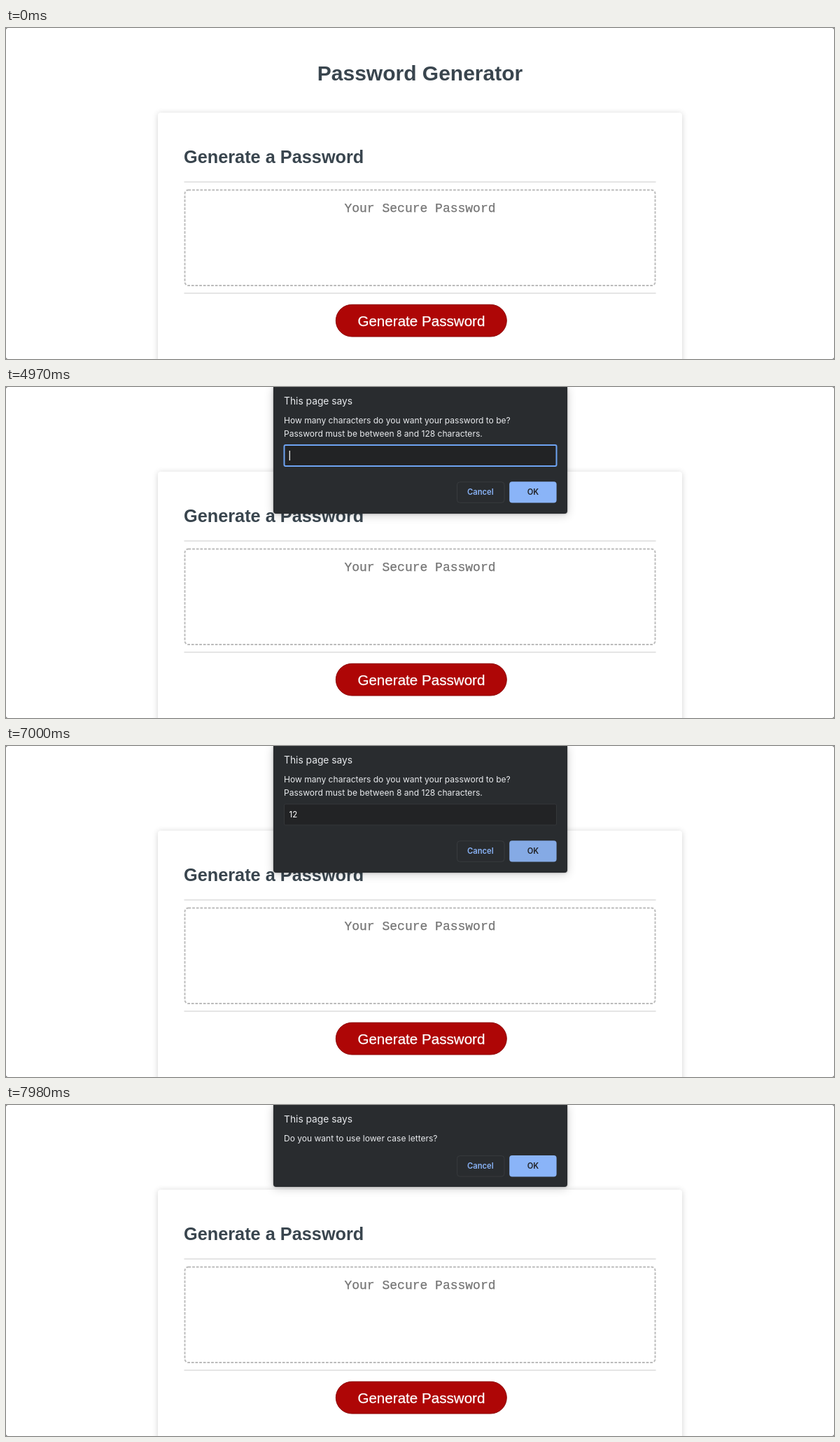
An HTML page for the animation above (8 s loop, 1183 by 473 pixels).

```html
<!DOCTYPE html>
<html lang="en">
<head>
<meta charset="utf-8">
<title>Password Generator</title>
<style>
  html, body { margin: 0; width: 100%; height: 100%; overflow: hidden; background: #666; }
  #stage { position: relative; width: 1183px; height: 473px; overflow: hidden; background: #fff; border-radius: 3px; }
  svg { display: block; }
  .sans { font-family: "Liberation Sans", Arial, sans-serif; }
  .heading { font-weight: 700; fill: #39454e; }
  .card { position: absolute; left: 217px; top: 121px; width: 749px; height: 400px; border-radius: 4px;
          box-shadow: 0 1px 8px rgba(0, 0, 0, .18); }
  #page { position: absolute; left: 0; top: 0; }
  .dialog { position: absolute; left: 381.5px; top: 0; width: 420px; background: #292c2f; border-radius: 0 0 4px 4px;
            transform-origin: 50% 100%; opacity: 0;
            box-shadow: 0 2px 14px rgba(0, 0, 0, .2), 0 0 3px rgba(0, 0, 0, .35); }
  .dialog text { font-family: Inter, sans-serif; font-size: 12.05px; fill: #e8eaed; }
  .dialog .title { font-size: 13.8px; }
  .dialog .label { font-size: 11.2px; font-weight: 600; text-anchor: middle; }
  .dialog .value { font-size: 11.5px; fill: #fff; }
</style>
</head>
<body>
<div id="stage">
  <div class="card"></div>
  <svg id="page" width="1183" height="473">
    <text class="sans heading" x="591.5" y="75" font-size="30" text-anchor="middle">Password Generator</text>
    <text class="sans heading" x="254" y="193" font-size="25.3">Generate a Password</text>
    <path d="M254.5 220H928.5M254.5 379H928.5" stroke="#e5e5e5" stroke-width="2"/>
    <rect x="255.5" y="231.5" width="672" height="136.5" rx="5" fill="none"
          stroke="#bbb" stroke-width="1.9" stroke-dasharray="3.75 1.9"/>
    <text x="591.5" y="263" font-size="18" fill="#757575" stroke="#757575" stroke-width=".25" text-anchor="middle"
          font-family="'Liberation Mono', 'Courier New', monospace">Your Secure Password</text>
    <rect x="471.3" y="395.3" width="244" height="45.7" rx="22.85" fill="#ae0606" stroke="#8c0505"/>
    <text class="sans" x="593.4" y="425.5" font-size="20.6" fill="#fff" stroke="#fff" stroke-width=".25"
          text-anchor="middle">Generate Password</text>
  </svg>
</div>
<script>
const LOOP = 8000, STEP = 70;
const stage = document.getElementById("stage");

// Dialog contents are laid out in stage coordinates through the viewBox.
function makeDialog(height, lines, field = "") {
  const el = document.createElement("div");
  const top = height - 45.2;
  el.className = "dialog";
  el.style.height = height + "px";
  el.innerHTML = `<svg width="420" height="${height}" viewBox="381.5 0 420 ${height}">
    <text class="title" x="396.5" y="25">This page says</text>
    ${lines.map((line, i) => `<text x="396.5" y="${52.3 + i * 18.7}">${line}</text>`).join("")}
    ${field}
    <rect x="644" y="${top + .5}" width="67.5" height="29.5" rx="4" fill="none" stroke="#383b3e"/>
    <text class="label" x="677.3" y="${top + 19}" style="fill:#8ab4f8">Cancel</text>
    <rect class="ok" x="718.7" y="${top}" width="67.4" height="30.3" rx="4" fill="#8ab4f8"/>
    <text class="label" x="752.4" y="${top + 19}" style="fill:#202124">OK</text>
  </svg>`;
  stage.append(el);
  return { el, height, ok: el.querySelector(".ok") };
}

const lengthDialog = makeDialog(180.5, [
  "How many characters do you want your password to be?",
  "Password must be between 8 and 128 characters."
], `<rect class="field" x="397" y="83" width="389" height="30" rx="2" fill="#222325"/>
    <text class="value" x="404" y="102"></text>
    <rect class="caret" y="91" width="1.2" height="14" fill="#fff"/>`);
const caseDialog = makeDialog(117.3, ["Do you want to use lower case letters?"]);
const [field, value, caret] = [".field", ".value", ".caret"].map(s => lengthDialog.el.querySelector(s));

const within = (t, from, to) => t >= from && t < to;
const mix = (a, b, k) => `rgb(${a.map((v, i) => Math.round(v + (b[i] - v) * k))})`;

// A tilted dialog leans back: its top narrows and it slides up.
function pose({ el, height }, opacity, tilted) {
  el.style.opacity = opacity;
  el.style.transform = tilted
    ? `matrix3d(1,0,0,0, 0,1.045,0,${-.04 / height}, 0,0,1,0, 0,-9.5,0,1)`
    : "none";
}

function draw(t) {
  const swapping = within(t, 7070, 7140);
  pose(lengthDialog, swapping ? .52 : +within(t, 3920, 7070), swapping);
  pose(caseDialog, swapping ? .38 : +(t >= 7140), swapping);

  const focused = t < 6930;
  field.setAttribute("stroke", focused ? "#6ea3f2" : "#34373a");
  field.setAttribute("stroke-width", focused ? 2 : 1);

  const typed = t < 5530 ? "" : t < 5880 ? "1" : "12";
  if (value.textContent !== typed) value.textContent = typed;
  const caretOn = within(t, 3920, 4480) || within(t, 4970, 6440) || within(t, 6860, 6930);
  caret.setAttribute("x", 404.2 + (typed ? value.getComputedTextLength() : 0));
  caret.setAttribute("opacity", +caretOn);

  const hover = Math.min(1, Math.max(0, (Math.floor(t / STEP) * STEP - 6230) / 350));
  lengthDialog.ok.setAttribute("fill", mix([138, 180, 248], [133, 170, 229], hover));
}

function tick() {
  draw(performance.now() % LOOP);
  requestAnimationFrame(tick);
}
tick();
</script>
</body>
</html>
```
